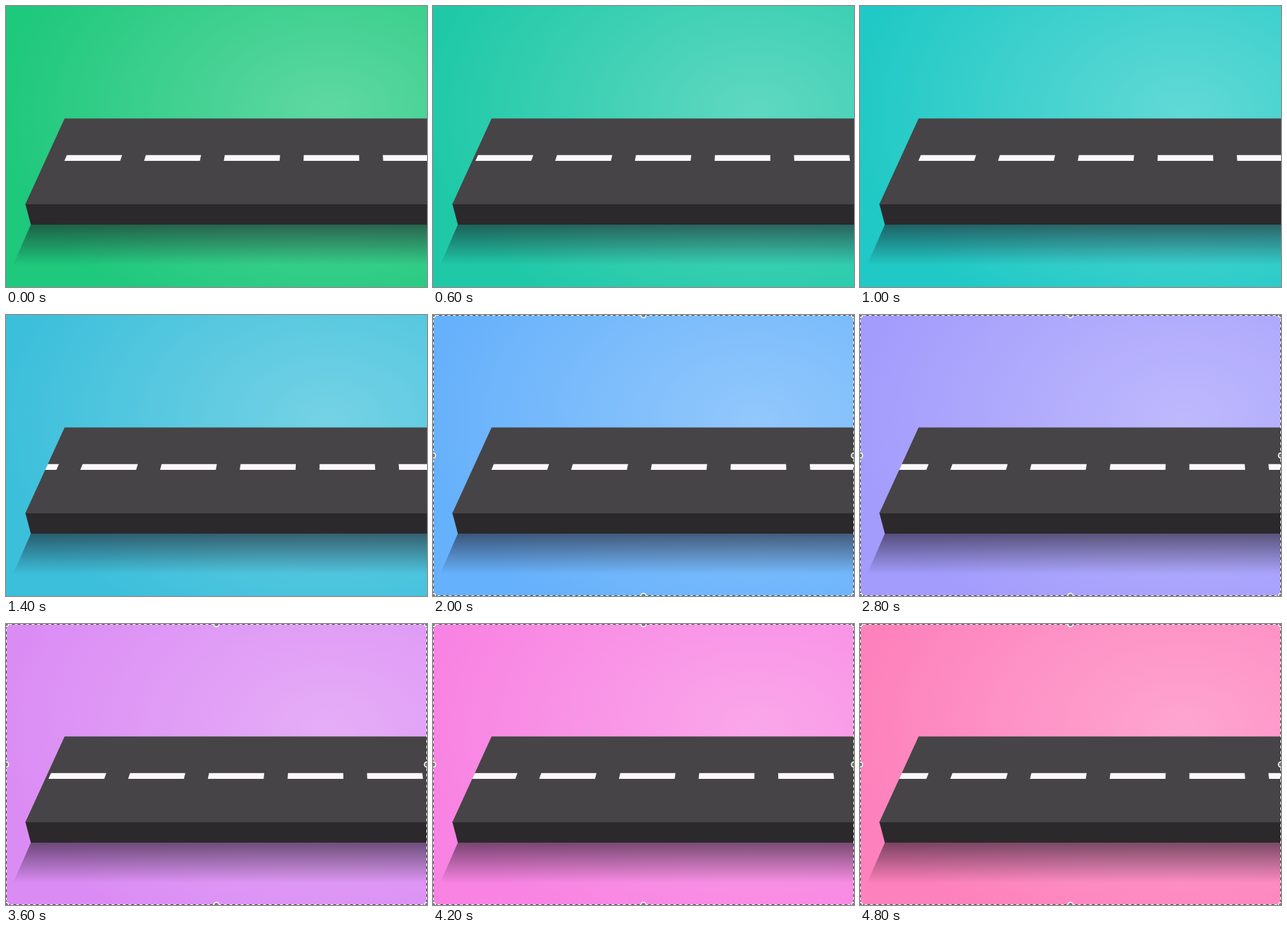
Write an HTML page that moves like this. It is 600 by 401 pixels and loops after 5 s.

```html
<!DOCTYPE html>
<html lang="en">
<head>
<meta charset="utf-8">
<title>Road</title>
<style>
  html, body { margin: 0; width: 100%; height: 100%; overflow: hidden; }
  svg { display: block; width: 600px; height: 401px; }
</style>
</head>
<body>
<svg viewBox="0 0 600 401">
  <defs>
    <radialGradient id="sky" gradientUnits="userSpaceOnUse" cx="0" cy="0" r="1"
        gradientTransform="translate(460 150) scale(470 330)">
      <stop id="light" offset="0"/>
      <stop id="deep" offset="1"/>
    </radialGradient>
    <linearGradient id="fade" x1="0" y1="0" x2="0" y2="1">
      <stop offset="0" stop-color="#1c1620" stop-opacity=".58"/>
      <stop offset="1" stop-color="#1c1620" stop-opacity="0"/>
    </linearGradient>
    <clipPath id="top"><path d="M83.500 160.600H600V283H27.500Z"/></clipPath>
  </defs>
  <rect width="600" height="401" fill="url(#sky)"/>
  <path d="M35.400 312H600V370H10Z" fill="url(#fade)"/>
  <path d="M27.500 282H600V312H35.400Z" fill="#2b292b"/>
  <path d="M83.500 160.600H600V283H27.500Z" fill="#464446"/>
  <path id="dashes" fill="#fdf8fc" clip-path="url(#top)"/>
  <g id="frame" fill="none">
    <rect x=".5" y=".5" width="599" height="400" stroke="#f4f4f4"/>
    <rect x=".5" y=".5" width="599" height="400" stroke="#444" stroke-dasharray="4"/>
    <g id="handles" fill="#777" stroke="#fff" stroke-width="1.500"></g>
  </g>
</svg>
<script>
const LOOP = 5000, STEP = 200;
const GAP = 113.6, DASH = 79.5, SHIFT = GAP * 2 / 5;
const VANISH_X = 470, LEAN = 0.009;
const FRAME_FROM = 2000;
const TINTS = ['1ec87c', '20c9c5', '66b1fb', 'b297fc', 'f684ee', 'ff80b0'].map(rgb);

const el = id => document.getElementById(id);
const light = el('light'), deep = el('deep'), dashes = el('dashes'), frame = el('frame');

let spots = '';
for (const x of [0, 300, 600])
  for (const y of [0, 200.5, 401])
    if (x !== 300 || y !== 200.5) spots += `<circle cx="${x}" cy="${y}" r="3.7"/>`;
el('handles').innerHTML = spots;

function rgb(hex) {
  return hex.match(/../g).map(part => parseInt(part, 16));
}

function mix(a, b, k) {
  return a.map((v, i) => v + (b[i] - v) * k);
}

function tint(t) {
  const pos = t / LOOP * (TINTS.length - 1), i = Math.floor(pos);
  const edge = mix(TINTS[i], TINTS[i + 1], pos - i);
  deep.setAttribute('stop-color', `rgb(${edge})`);
  light.setAttribute('stop-color', `rgb(${mix(edge, [255, 255, 255], 0.29)})`);
}

// Dash ends lean towards the vanishing point.
function dash(x) {
  const end = x + DASH;
  const upper = v => v + (VANISH_X - v) * LEAN;
  return `M${x} 221L${upper(x)} 212.8H${upper(end)}L${end} 221Z`;
}

function draw(time) {
  const step = Math.floor(time % LOOP / STEP);
  tint(step * STEP);
  let d = '';
  for (let x = 83.2 - step * SHIFT % GAP - GAP; x < 600; x += GAP) d += dash(x);
  dashes.setAttribute('d', d);
  frame.style.display = step * STEP >= FRAME_FROM ? '' : 'none';
}

const begin = performance.now();
function tick() {
  draw(performance.now() - begin);
  requestAnimationFrame(tick);
}
tick();
</script>
</body>
</html>
```
